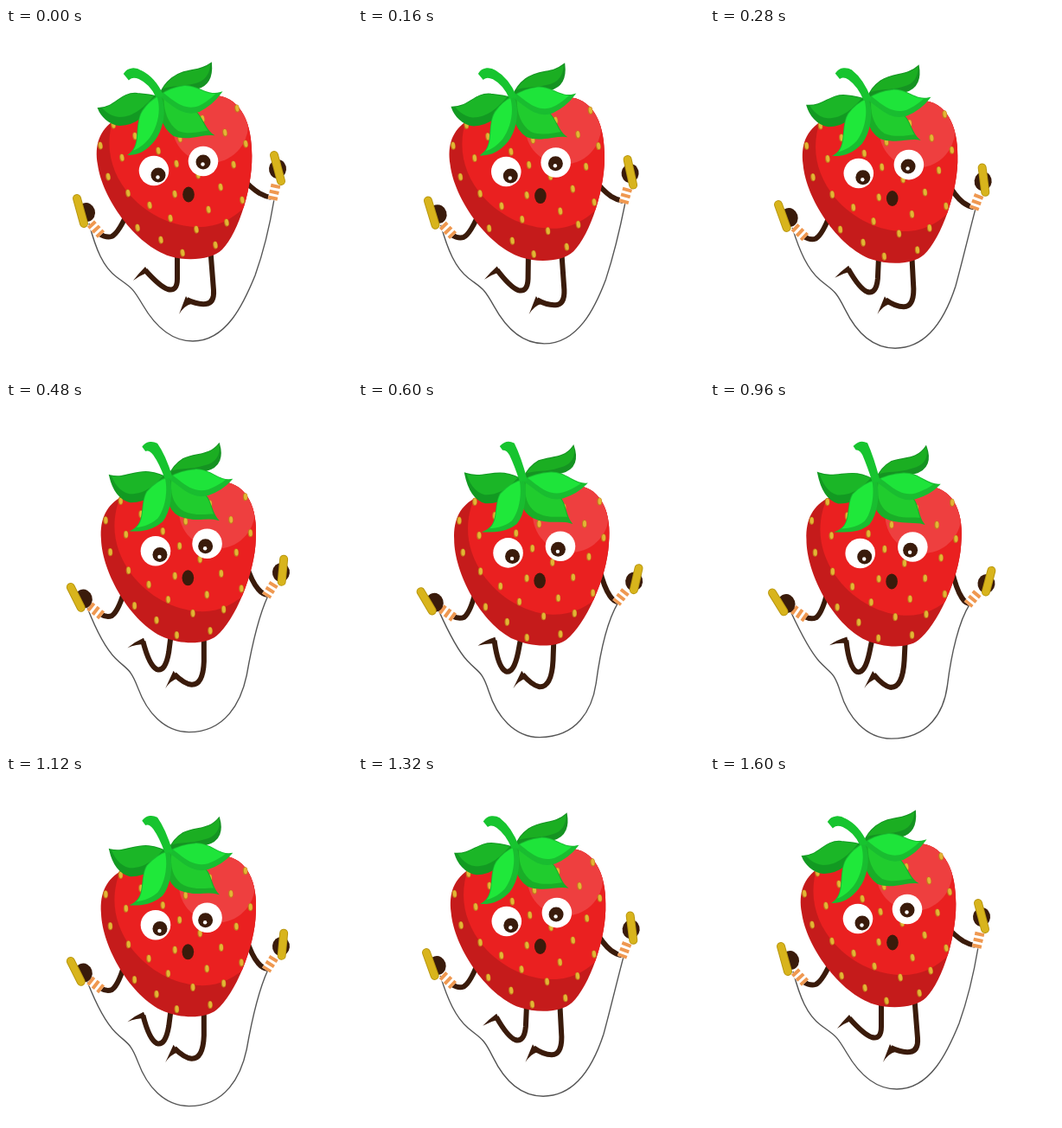
Animation, 400 px wide and 400 px high, one loop 1680 ms. Source, as an HTML page with a canvas:

```html
<!DOCTYPE html>
<html lang="en">
<head>
<meta charset="utf-8">
<title>Strawberry skipping rope</title>
<style>
  html, body { margin: 0; height: 100%; overflow: hidden; background: #fff; }
  canvas { display: block; width: 100vw; height: 100vh; }
</style>
</head>
<body>
<canvas id="stage" width="400" height="400"></canvas>
<script>
const ctx = document.getElementById('stage').getContext('2d');
const BROWN = '#3a1b0b', WHITE = '#fff', STEM = '#17c42f';
const STEP = 40, SWING = 1600, LOOP = 1680;

// Each moving shape is a pair of matching paths: start and far end of the swing.
const rope = [
  'M96 226 C104 256 112 276 128 288 S145 298 158 320 C172 344 190 362 216 362 C255 362 275 318 288 286 C298 258 305 228 310 198',
  'M93 244 C102 262 114 287 126 301 S143 312 150 337 C158 366 179 392 209 392 C253 392 270 362 273 332 C277 294 286 256 299 238'];

const limbs = [
  ['M198 255 L198 290 Q198 305 187 302 Q178 299 161 280', 'M188 268 L183 289 Q177 316 168 313 Q159 308 157 275'],
  ['M236 252 L240 303 Q241 318 231 319 Q221 320 209 314', 'M225 270 L223 298 Q221 332 206 331 Q198 329 187 315'],
  ['M143 208 Q130 238 122 241 Q116 243 108 238', 'M137 212 Q131 243 123 250 Q117 253 109 249'],
  ['M274 174 Q282 184 293 191 Q300 195 307 196', 'M280 196 Q285 220 291 230 Q295 237 300 237']];

const feet = [
  ['M147 292 Q153 284 161 276 L165 282 Q155 286 147 292Z', 'M137 280 Q146 274 158 271 L160 279 Q148 277 137 280Z'],
  ['M200 331 L208 310 L214 319 Q206 321 200 331Z', 'M176 331 L186 311 L192 319 Q181 323 176 331Z']];

const cuffs = [
  ['M98 226 L110 239', 'M96 241 L111 251'],
  ['M312 181 L308 199', 'M309 225 L297 238']];

const hands = [[[93, 213], [88, 235]], [[314, 163], [320, 215]]];

const handles = [
  ['M82 197 L90 226', 'M71 223 L85 244'],
  ['M310 147 L318 177', 'M327 200 L319 224']];

// Leaves: paths, shade colour, light colour, offset of the light part.
const leaves = [
  ['M237 41 C222 52 208 46 192 58 Q182 66 178 77 C195 72 205 74 220 70 C236 66 238 52 237 41Z',
   'M251 53 C242 68 228 66 212 70 Q199 77 193 92 C208 86 220 90 236 84 C255 80 256 66 251 53Z',
   '#159322', '#1bae22', -1, -6],
  ['M107 93 C128 92 132 74 152 76 Q166 77 178 80 C164 98 150 112 132 112 C119 111 110 101 107 93Z',
   'M127 81 C143 88 157 82 172 84 Q184 86 193 93 C180 108 168 118 150 117 C136 113 130 97 127 81Z',
   '#129a22', '#1bb627', -1, -9],
  ['M238 123 C228 116 228 102 214 92 Q198 80 178 78 C176 96 180 114 194 124 C210 130 226 122 238 123Z',
   'M247 142 C239 130 244 116 228 106 Q212 95 193 92 C187 110 190 128 204 135 C220 143 236 138 247 142Z',
   '#19ae28', '#20cc2e', 5, -5],
  ['M248 75 C232 80 222 66 206 67 Q190 69 178 78 C190 86 204 103 223 96 C235 90 243 82 248 75Z',
   'M266 98 C252 98 244 84 226 84 Q207 85 193 93 C206 98 218 118 239 113 C253 109 261 103 266 98Z',
   '#19bd30', '#1ee43a', 0, -6],
  ['M143 146 C158 134 148 112 158 96 Q166 84 178 78 C186 96 180 118 171 130 C163 140 154 146 143 146Z',
   'M148 150 C166 142 158 122 166 108 Q178 95 193 92 C197 108 194 131 185 142 C173 151 160 150 148 150Z',
   '#19bd30', '#1fe83a', -5, -3]];

const stem = [
  'M137 53 C141 46 150 46 156 50 Q172 58 181 78 L174 79 Q167 64 154 58 Q146 55 142 59Z',
  'M170 51 C175 46 180 46 184 48 Q190 64 197 92 L190 93 Q184 74 180 62 Q177 54 172 54Z'];

const eyes = [
  { ball: [[171, 165], [174, 176]], pupil: [[176, 170], [179, 180]] },
  { ball: [[228, 154], [235, 169]], pupil: [[228, 155], [232, 173]] }];
const mouth = [[211, 192.5], [210, 209]];

const berry = new Path2D('M126 106 C108 118 102 135 106 158 C111 196 149 251 190 264 C210 270 238 268 250 256 C269 237 287 180 284 140 C283 105 268 78 240 78 C220 78 205 84 190 92 C165 96 145 96 126 106Z');
const lit = new Path2D('M124 104 C113 140 123 170 144 194 C167 219 198 231 226 230 C250 229 268 217 284 198 L300 60 L150 60Z');
const seeds = [
  [109, 136], [118, 172], [141, 191], [134, 150], [124, 112], [149, 125], [176, 142], [201, 128], [227, 105],
  [267, 93], [253, 121], [277, 134], [263, 158], [197, 157], [222, 170], [248, 184], [273, 199], [195, 192],
  [234, 210], [166, 205], [190, 220], [220, 233], [255, 225], [152, 231], [179, 245], [242, 251], [204, 260]];

let pose = 0;
const mix = (a, b) => a + (b - a) * pose;
const at = ([a, b]) => [mix(a[0], b[0]), mix(a[1], b[1])];

function morph([from, to]) {
  const ends = to.match(/[\d.]+/g);
  let i = 0;
  return new Path2D(from.replace(/[\d.]+/g, n => mix(+n, +ends[i++])));
}

function fill(path, color) {
  ctx.fillStyle = color;
  ctx.fill(path);
}

function stroke(path, color, width, cap = 'butt') {
  ctx.strokeStyle = color;
  ctx.lineWidth = width;
  ctx.lineCap = cap;
  ctx.stroke(path);
}

function oval([x, y], rx, ry, color, tilt = 0) {
  ctx.beginPath();
  ctx.ellipse(x, y, rx, ry, tilt, 0, 7);
  ctx.fillStyle = color;
  ctx.fill();
}

function clipped(path, paint) {
  ctx.save();
  ctx.clip(path);
  paint();
  ctx.restore();
}

function drawBerry() {
  ctx.save();
  ctx.translate(116 + 2 * pose, 184 + 2 * pose);
  ctx.rotate(0.152 * pose);
  ctx.translate(-116, -184);
  fill(berry, '#c51b1b');
  clipped(berry, () => {
    fill(lit, '#ea2020');
    oval([236, 112], 44, 44, '#ee3f3f');
  });
  for (const [x, y] of seeds) {
    oval([x, y], 2.8, 4.6, '#c27a1c', -0.15);
    oval([x + 0.3, y - 0.3], 2, 3.8, '#e3b535', -0.15);
  }
  ctx.restore();
}

function drawLeaf([from, to, shade, light, dx, dy]) {
  const leaf = morph([from, to]);
  fill(leaf, shade);
  stroke(leaf, shade, 2);
  clipped(leaf, () => {
    ctx.translate(dx, dy);
    fill(leaf, light);
  });
}

function drawFace() {
  for (const { ball, pupil } of eyes) {
    const [x, y] = at(pupil);
    oval(at(ball), 17.3, 17.3, WHITE);
    oval([x, y], 8.5, 8.5, BROWN);
    oval([x - 0.5, y + 2.5], 2.2, 2.2, WHITE);
  }
  oval(at(mouth), 6.8, 9, BROWN);
}

function drawHand(i) {
  const cuff = morph(cuffs[i]), handle = morph(handles[i]);
  stroke(cuff, WHITE, 11);
  ctx.setLineDash([4, 3]);
  stroke(cuff, '#ef9850', 11);
  ctx.setLineDash([]);
  oval(at(hands[i]), 10, 11, BROWN, i ? 0.1 : -0.3);
  stroke(handle, '#b8960f', 10, 'round');
  stroke(handle, '#d8b41c', 8, 'round');
}

function draw() {
  const time = Math.min(Math.floor(performance.now() % LOOP / STEP) * STEP, SWING);
  pose = (1 - Math.cos(2 * Math.PI * time / SWING)) / 2;
  ctx.fillStyle = WHITE;
  ctx.fillRect(0, 0, 400, 400);
  stroke(morph(rope), '#555', 1.4);
  for (const limb of limbs) stroke(morph(limb), BROWN, 6);
  for (const foot of feet) fill(morph(foot), BROWN);
  drawHand(0);
  drawHand(1);
  drawBerry();
  leaves.forEach(drawLeaf);
  fill(morph(stem), STEM);
  stroke(morph(stem), STEM, 2);
  drawFace();
  requestAnimationFrame(draw);
}
draw();
</script>
</body>
</html>
```
